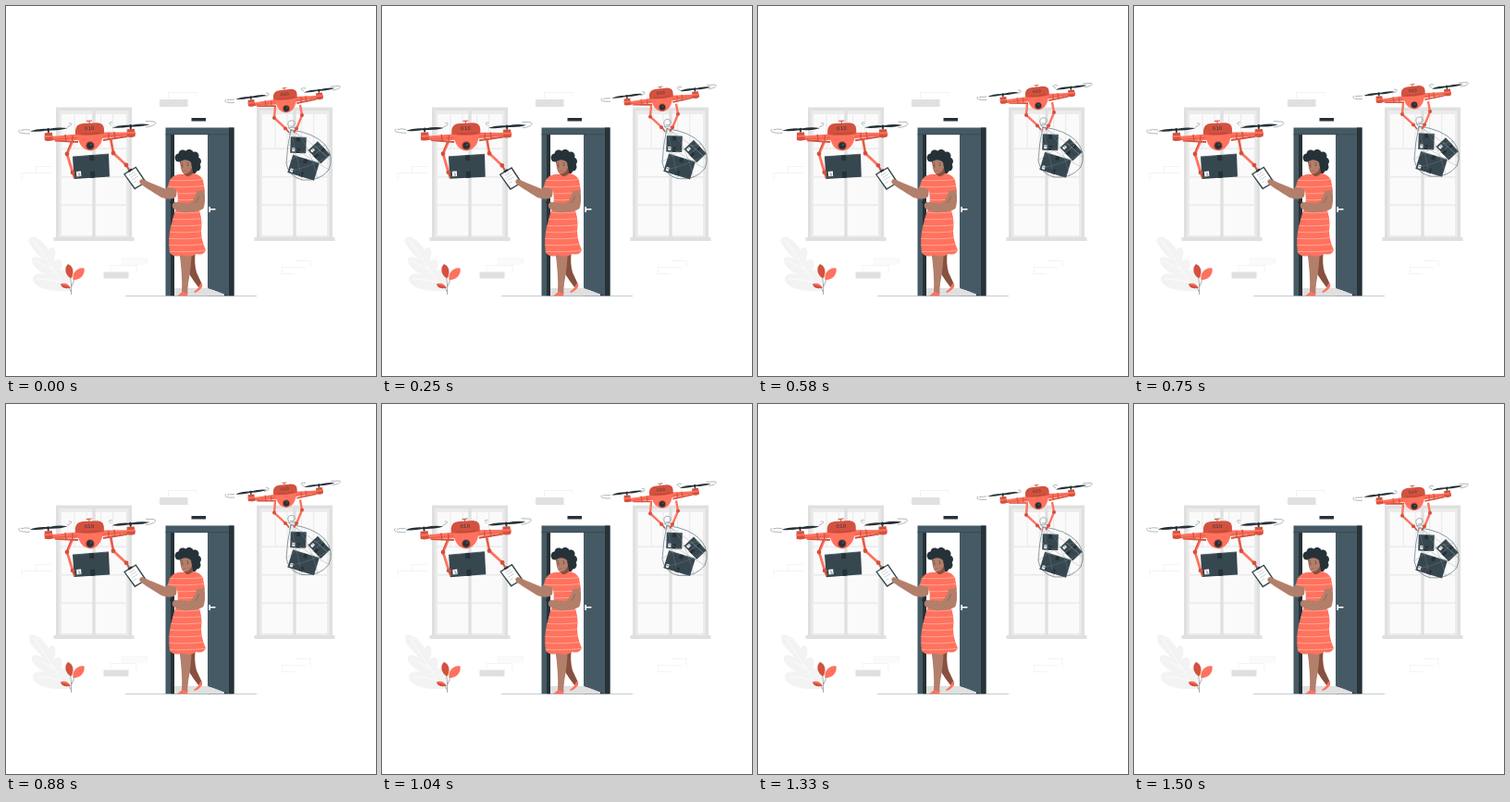
Animation, 400 px wide and 400 px high, one loop 1540 ms. Source, as an HTML page with a canvas:

```html
<!DOCTYPE html>
<html lang="en">
<head>
<meta charset="utf-8">
<title>Drone delivery</title>
<style>
html, body { margin: 0; width: 100%; height: 100%; overflow: hidden; background: #fff; }
canvas { display: block; width: 400px; height: 400px; }
</style>
</head>
<body>
<canvas id="stage" width="400" height="400"></canvas>
<script>
const ctx = document.getElementById('stage').getContext('2d');
const LOOP = 1540, STEPS = 37;
const CORAL = '#ff725e', RUST = '#d3523f', BRICK = '#a63c2e';
const SLATE = '#455a64', STEEL = '#37474f', INK = '#263238';
const SKIN = '#b27f6b', SHADE = '#87503f';
const GREY = '#e0e0e0', MIST = '#ebebeb', PALE = '#f3f3f3', PANE = '#fafafa';

function fill(d, color) {
  ctx.fillStyle = color;
  ctx.fill(new Path2D(d));
}
function line(d, color, width = 0.6) {
  ctx.strokeStyle = color;
  ctx.lineWidth = width;
  ctx.stroke(new Path2D(d));
}
function rect(x, y, w, h, color) {
  ctx.fillStyle = color;
  ctx.fillRect(x, y, w, h);
}
function dot(x, y, r, color) {
  ctx.fillStyle = color;
  ctx.beginPath();
  ctx.arc(x, y, r, 0, 7);
  ctx.fill();
}

function placed(x, y, degrees, scale, draw) {
  ctx.save();
  ctx.translate(x, y);
  ctx.rotate(degrees * Math.PI / 180);
  ctx.scale(scale, scale);
  draw();
  ctx.restore();
}

function drawWindow(x) {
  rect(x, 109.5, 82, 141, GREY);
  rect(x + 3.5, 113, 75, 137, MIST);
  rect(x + 6, 117, 70, 131, PANE);
  for (const dx of [19.5, 32.5, 48, 61]) rect(x + dx, 117, 1.2, 37, MIST);
  for (const y of [153.5, 184, 214.5]) rect(x + 6, y, 70, 1.6, MIST);
  rect(x + 39.3, 113, 3.4, 137, GREY);
  rect(x - 2.5, 250, 87, 4, GREY);
}

function drawWall() {
  rect(166, 101, 30.5, 8, GREY);
  rect(105.5, 287.5, 27, 7, GREY);
  rect(125, 272, 28, 8, PANE);
  line('M175.5 100V93.5H206V97M113 287V280.5H141V288M49 173.5H32.5V180.5H17V188M32.5 180.5H49' +
    'M329 282V275.5H312.5M298.5 290V282.5H324M298.5 289.5H312', MIST);
  rect(200.5, 121, 15.5, 3.5, INK);
}

function drawPlant() {
  fill('M68 308C50 309 32 306 29 296C28 290 37 287 43 291C35 286 26 279 28 273C31 269 40 273 44 278' +
    'C34 268 23 258 25 251C30 246 42 255 46 264C49 258 55 261 53 270L52 276C59 270 63 277 59 287' +
    'C67 282 71 291 68 308Z', PALE);
  line('M30 253C42 270 54 289 66 307M31 275Q42 280 52 286M33 295Q48 295 60 299', '#fff', 0.7);
  line('M70.5 312C71 301 70 294 68 286M71 303Q73 294 80 287M70.5 309Q68 303 63 301', SLATE, 0.5);
  fill('M70.500 294.500C63 291 63 282 67 279C73 281 74 289 70.500 294.500Z', RUST);
  fill('M72.500 296C71 288 78 282 84.500 283.500C86 291 79 297 72.500 296Z', CORAL);
  fill('M70 304.500Q66 298 59 300.500Q61 307 70 304.500Z', CORAL);
  fill('M70 304.500Q66 302 59 300.500Q61 307 70 304.500Z', RUST);
}

function drawDoor() {
  rect(172.5, 131.5, 74, 182, SLATE);
  rect(178, 139, 63, 174.5, INK);
  rect(182, 139, 36.5, 174.5, '#fff');
  fill('M182 305H218L236 310V313.5H182Z', GREY);
  fill('M218 139H241V313.5L218 304.5Z', SLATE);
  rect(241, 131.5, 5.5, 182, INK);
  rect(172.5, 138.3, 68.5, 0.9, STEEL);
  rect(219.3, 217, 1.6, 6, '#fff');
  rect(220, 219, 6.5, 1.5, '#fff');
  line('M129 313.5H271', '#a3acb0', 0.6);
}

function drawStripes(dress) {
  ctx.save();
  ctx.clip(new Path2D(dress));
  for (let y = 188; y < 270; y += 7) line(`M173 ${y}Q194 ${y + 2} 218 ${y - 1}`, '#ffc4bb', 0.6);
  ctx.restore();
}

function drawWoman() {
  const dress = 'M181 184Q187 181 193 182Q197 187 202 181Q210 182 213 188L215 200L207 202L207 217' +
    'Q213 228 211 243Q211 253 216 264Q213 270 206 268Q198 273 190 269Q183 273 177 267Q175 252 178 239' +
    'Q181 226 185 215Q187 206 184 198L175 196Q176 187 181 184Z';
  fill('M195 264H205Q203 278 206 288L212 301L208 304Q197 290 191 276Z', SHADE);
  fill('M203 309Q209 305 210 300Q213 300 212 304Q208 309 204 310Z', CORAL);
  fill('M187 264H201Q200 284 197 300L196 311H190Q191 289 187 264Z', SKIN);
  fill('M185 313.3Q190 310 191 308Q194 312 197 309L196 313.3Z', CORAL);
  fill('M175 194L185 197L184 206Q179 211 168 207L152 197L145 192Q143 188 147 187L156 191L173 198Z', SKIN);

  const curls = [[187, 164, 4.5], [191, 160, 4.5], [198, 159.5, 4.5], [204, 162, 4.5],
    [206.5, 168, 4.5], [206, 174, 4.5], [202, 177, 4.5], [197, 168, 9]];
  for (const [x, y, r] of curls) dot(x, y, r, INK);
  fill('M194 177L201 175L203 184Q197 190 192 183Z', SHADE);
  fill('M188.5 168Q188 178 192 181.500Q198 182 201 175L200 169Q195 164 188.5 168Z', SKIN);
  line('M189 169.800L191.5 169M195 169.5L198 170.5M190.8 171.5V175', SHADE, 0.7);
  dot(190.3, 171.8, 0.6, INK);
  dot(196.5, 172.2, 0.6, INK);
  line('M191.5 178Q193.5 179 195 177.6', RUST, 0.9);

  fill(dress, CORAL);
  drawStripes(dress);
  fill('M206 200L214.5 199Q216 212 213.500 219Q207 224 190 223L181 219Q178 215 182 212L199 213Q205 208 206 200Z', SKIN);
  line('M204 213Q208 211 208.5 205', SHADE, 0.5);
  fill('M177 211L181 212L180 214L177 213Z', INK);
}

// Drone body with the camera at the origin.
function drawDrone() {
  line('M-1 -24V-27M-4 -26.5L2 -27', RUST, 1);
  line('M-38 -5.500L-13 -4M14 -6L40 -10', RUST, 2);
  fill('M-48 -9.500L-14 -12.500L14 -14.500L49 -14.500L49 -11.500L14 -8L-14 -6L-48 -5.500Z', CORAL);
  line('M-45 -6.500L47 -12.500', RUST, 0.6);
  fill('M-14 -13L14 -14Q13 3 1 5.500Q-12 5 -14 -13Z', CORAL);
  fill('M-16 -12V-17Q-15 -23.500 -8 -24L8 -24.800Q15 -24 15 -18V-13Q0 -10 -16 -12Z', RUST);
  line('M-10 -13Q0 -12 11 -14', BRICK, 0.6);
  placed(-0.5, -17, -3, 1, () => {
    ctx.font = '5.5px "Liberation Sans", sans-serif';
    ctx.letterSpacing = '0.6px';
    ctx.textAlign = 'center';
    ctx.fillStyle = INK;
    ctx.fillText('010', 0, 0);
  });
  line('M-27 -12L-26 -4M26 -15L27 -7M-19 -11V-5M20 -14V-7', RUST, 1.4);
  dot(0, 0, 5, RUST);
  dot(0, 0, 3.8, INK);
  dot(0.8, -1, 1.1, SLATE);
  for (const [x, y] of [[-45, -11], [44, -15]]) drawRotor(x, y);
}

function drawRotor(x, y) {
  placed(x, y, -2.5, 1, () => {
    fill('M-4 -3H4L4.5 5Q0 7 -4.5 5Z', RUST);
    rect(-4.5, 0, 9, 2, CORAL);
    rect(-0.8, -7, 1.6, 4, INK);
    fill('M-1 -5.5Q-12 -4 -20 -5.5Q-12 -8.5 -1 -7.2L1 -7.2Q12 -9 21 -7Q13 -4.5 1 -5.5Z', INK);
    dot(0, -6.3, 1.7, INK);
  });
}

function drawWhirl(d) { line(d, '#78858b', 0.6); }

function joints(points, r) {
  for (const [x, y] of points) dot(x, y, r, RUST);
}

function drawParcelDrone() {
  drawWhirl('M15 133.5C12 136 14 138 26 138M16 134.5Q20 133 26 134M66 131C72 129 72 126 68 127' +
    'M114 129C111 127 111 125 115 126M151 131C161 130 164 126 160 125L151 124.5');
  fill('M72 163L111 160L112 184.5L73.5 187Z', STEEL);
  line('M72 163L111 160', SLATE, 0.8);
  fill('M90 161.6L95 161.2L95.5 167L90.5 167.3Z', INK);
  fill('M91 179L96 178.7L96.3 185.5L91.3 186Z', INK);
  fill('M76 179L81 178.5L81.4 184L76.4 184.4Z', '#fff');
  line('M77.5 180L80 182M78 183H80.5', INK, 0.6);
  line('M72 146L66 160L72 180', CORAL, 2.8);
  line('M113 143L116 159L130 172', CORAL, 2.8);
  line('M70.5 147L66 158M113.5 145L116 157', RUST, 1.2);
  joints([[66, 160], [116, 159], [72, 180], [130, 172]], 2.4);
  line('M72 180L74 186M130 172L133 177', RUST, 2);
  placed(91, 151, 0, 1, drawDrone);
  fill('M127 181.5L140.5 173.5L152 190.5L139 198.5Z', STEEL);
  fill('M128.8 182L140 175.3L150 190.2L139.5 196.5Z', '#fff');
  fill('M131.5 178L135.5 175.5L136.5 177.5L133 179.7Z', INK);
  line('M133 183L139 179.5M134.5 185.5L141 181.5M136 188L143 184M138 191L141 189.3', '#b5bdc1', 0.7);
}

function crate(x, y, angle, w, h) {
  placed(x, y, angle, 1, () => {
    rect(-w / 2, -h / 2, w, h, STEEL);
    line(`M${-w / 2} ${-h / 2}H${w / 2}`, SLATE, 0.8);
    rect(-2, -h / 2, 4, 4.5, INK);
    rect(-2, h / 2 - 5, 4, 5, INK);
    rect(2 - w / 2, h / 2 - 5.5, 3, 4, '#fff');
    line(`M${2.5 - w / 2} ${h / 2 - 4}h2`, INK, 0.6);
  });
}

function drawNetDrone() {
  drawWhirl('M238 101C235 103 238 105 247 104.5M239 101.5L247 101M279 98C285 97 286 94 281 94' +
    'M322 92C317 90 319 88 324 89M353 91C362 90 363 86 359 86.5L351 87');
  crate(316, 150.5, 2, 17, 17);
  crate(338.5, 158.5, 47, 20, 14);
  line('M331 163L345 151M334 151L347 163', '#8b989e', 0.5);
  crate(321.5, 175, 17, 30, 19.5);
  line('M308 134Q304 151 303 170Q305 184 320 188Q339 190 349 177Q355 163 345 150Q333 137 308 134', SLATE, 0.6);
  line('M308 134Q326 142 337 187M308 134Q313 158 320 188M308 134Q328 145 351 167M303 170Q324 154 345 150' +
    'M304 179Q331 174 351 161M306 150Q330 166 349 177', '#7f8c92', 0.35);
  line('M291 109L290 121L303 133M318 107L320 118L314 133', CORAL, 2.4);
  joints([[290, 121], [320, 118], [302, 132.5], [314, 132.5]], 2);
  line('M303 133L306 137M314 133L311 137', RUST, 1.6);
  line('M308 135Q302 126 307 124Q313 123 312 128Q311 131 307 130M305 132L312 131M309 133L306 139', '#849097', 0.7);
  placed(303, 110.8, -3.3, 0.83, drawDrone);
}

function drawScene(phase) {
  const sway = phase < 0.25 ? 4 * phase : phase < 0.75 ? 2 - 4 * phase : 4 * phase - 4;
  const lift = 4 * (1 - Math.abs(1 - 2 * phase));
  rect(0, 0, 400, 400, '#fff');
  drawWindow(54);
  drawWindow(271);
  drawWall();
  drawPlant();
  drawDoor();
  placed(88, 160, sway, 1, () => {
    ctx.translate(-88, -160);
    drawParcelDrone();
  });
  placed(0, -lift, 0, 1, drawNetDrone);
  drawWoman();
}

ctx.lineJoin = 'round';
const start = performance.now();
function tick() {
  const time = (performance.now() - start) % LOOP;
  const step = Math.floor(time * STEPS / LOOP + 0.1) % STEPS;
  drawScene(step / STEPS);
  requestAnimationFrame(tick);
}
tick();
</script>
</body>
</html>
```
